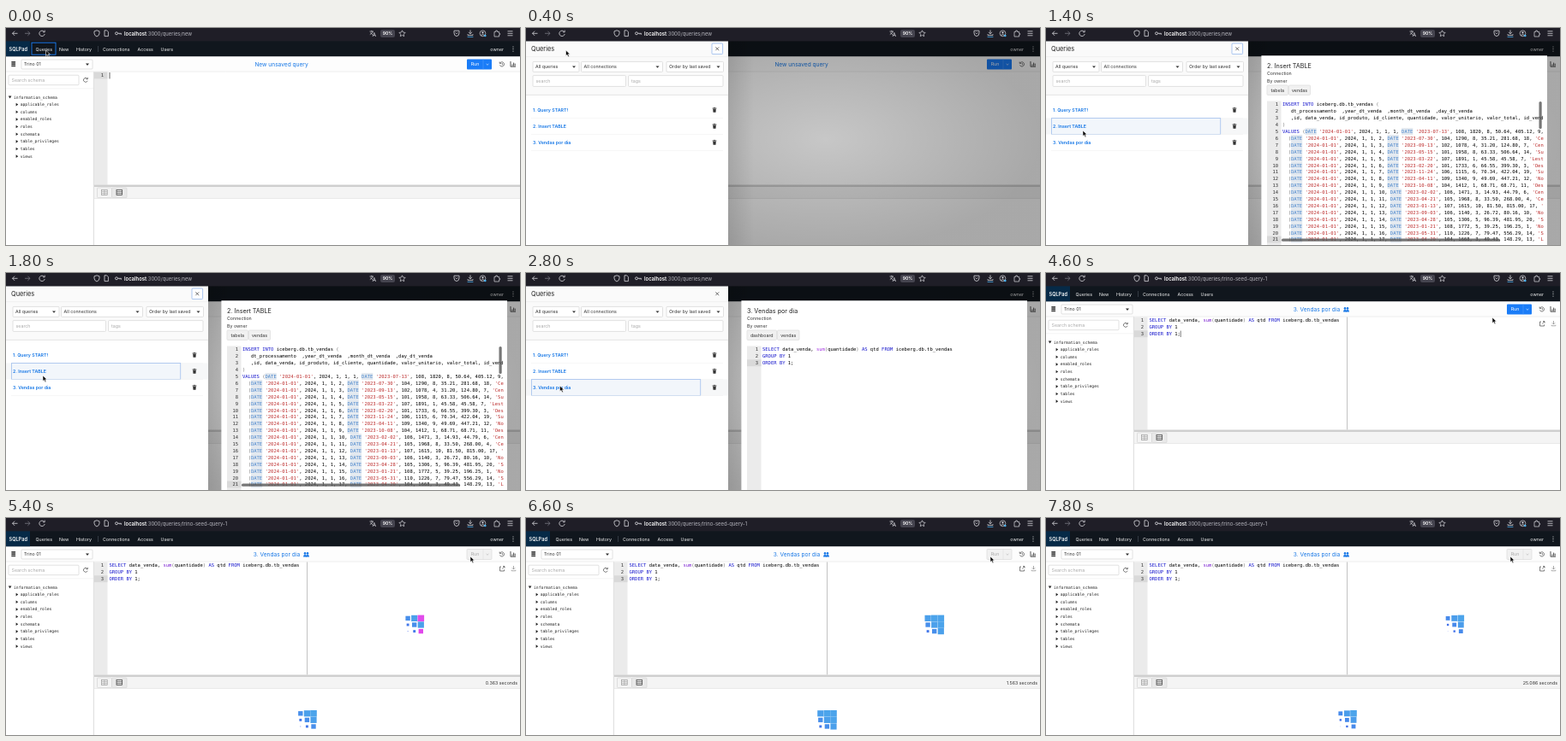
Write an HTML page that moves like this. It is 600x254 px and loops after 8 s.

```html
<!DOCTYPE html>
<html lang="en">
<head>
<meta charset="utf-8">
<title>Query editor</title>
<style>
  html, body { margin: 0; width: 100%; height: 100%; overflow: hidden; background: #fff; }
  svg { display: block; width: 100vw; height: 100vh; }
  text { font-family: Inter, "Open Sans", sans-serif; white-space: pre; }
  .mono { font-family: "DejaVu Sans Mono", monospace; }
</style>
</head>
<body>
<svg id="stage" viewBox="0 0 600 254"></svg>
<script>
const LOOP = 8000, STEP = 200;
const BLUE = '#1a7cf7', LINK = '#1677e6', INK = '#333', LINE = '#d4d4d4', SOFT = '#86aeea';
const USER = 'owner';
const TOP = 15.4;

// --- drawing helpers ---
const esc = s => String(s).replace(/&/g, '&amp;').replace(/</g, '&lt;');
const rect = (x, y, w, h, fill, more = '') =>
  `<rect x="${x}" y="${y}" width="${w}" height="${h}" fill="${fill}" ${more}/>`;
const box = (x, y, w, h, fill = '#fff', stroke = LINE) =>
  rect(x, y, w, h, fill, `rx="1" stroke="${stroke}" stroke-width=".7"`);
const text = (x, y, s, size = 5.3, fill = INK, more = '') =>
  `<text x="${x}" y="${y}" font-size="${size}" fill="${fill}" ${more}>${esc(s)}</text>`;
const path = (d, stroke, w = .8, fill = 'none') =>
  `<path d="${d}" stroke="${stroke}" stroke-width="${w}" fill="${fill}"/>`;
const group = (id, body, more = '') => `<g id="${id}" ${more}>${body}</g>`;
const caretDown = (x, y, fill = INK) => path(`M${x - 2} ${y - 1}h4l-2 2.4z`, 'none', 0, fill);
const select = (x, y, w, h, label) =>
  box(x, y, w, h) + text(x + 3, y + h / 2 + 1.9, label) + caretDown(x + w - 6, y + h / 2);
const input = (x, y, w, h, label) => box(x, y, w, h) + text(x + 3.5, y + h / 2 + 1.9, label, 5.3, '#aaa');

// --- SQL text ---
const PITCH = 7.9, CODE = 5.5, CHAR = CODE * .602;
const SHADES = { str: '#bc2c2c', type: '#4a86cc', word: '#1616cc', par: '#777' };
const TOKEN = /('[^']*'?)|\b(DATE)\b|\b(SELECT|AS|FROM|GROUP|ORDER|BY|INSERT|INTO|VALUES)\b|\b(sum)\b|([()])/g;

function highlight(line, fn) {
  return line.replace(TOKEN, (s, str, type, word, sum) => {
    const c = str ? SHADES.str : type ? SHADES.type : word ? SHADES.word : sum ? fn : SHADES.par;
    return `<tspan fill="${c}">${s}</tspan>`;
  });
}
function code(lines, x, y, numX, fn) {
  return lines.map((line, i) => {
    const base = y + i * PITCH, at = `class="mono" font-size="${CODE}" y="${base}"`;
    const marks = [...line.matchAll(/\bDATE\b/g)].map(m =>
      rect(x + m.index * CHAR, base - 5.9, 4 * CHAR, PITCH, '#e2e8ef')).join('');
    return marks + `<text ${at} x="${numX}" fill="#333" text-anchor="end">${i + 1}</text>` +
           `<text ${at} x="${x}" fill="#000">${highlight(line, fn)}</text>`;
  }).join('');
}

const selectSql = [
  'SELECT data_venda, sum(quantidade) AS qtd FROM iceberg.db.tb_vendas',
  'GROUP BY 1',
  'ORDER BY 1;'
];
// day, product, client, quantity, unit price, seller, region
const sales = `07-13 108 1820 8 50.64 9 Centro|07-30 104 1290 8 35.21 18 Centro
09-13 102 1078 4 31.20 7 Centro|05-15 101 1958 8 63.33 14 Sul
03-22 107 1891 1 45.58 7 Leste|02-20 101 1733 6 66.55 3 Oeste
11-24 106 1115 6 70.34 19 Sul|04-11 109 1340 9 49.69 12 Norte
10-08 104 1412 1 68.71 11 Oeste|02-02 106 1471 3 14.93 6 Centro
04-21 105 1968 8 33.50 4 Centro|01-13 107 1615 10 81.50 17 Sul
09-03 106 1140 3 26.72 10 Norte|04-28 105 1306 5 96.39 20 Sul
01-21 108 1772 5 39.25 1 Norte|05-31 110 1226 7 79.47 14 Sul
04-20 104 1668 3 49.43 13 Leste`.split(/[|\n]/);
const insertSql = [
  'INSERT INTO iceberg.db.tb_vendas (',
  '   dt_processamento  ,year_dt_venda  ,month_dt_venda  ,day_dt_venda',
  '   ,id, data_venda, id_produto, id_cliente, quantidade, valor_unitario, valor_total, id_vendedor',
  ')',
  ...sales.map((row, i) => {
    const [day, item, client, n, price, seller, region] = row.split(' ');
    return `${i ? '  ' : 'VALUES '}(DATE '2024-01-01', 2024, 1, 1, ${i + 1}, DATE '2023-${day}', ` +
      `${item}, ${client}, ${n}, ${price}, ${(n * price).toFixed(2)}, ${seller}, '${region}'),`;
  })
];

// --- browser bar ---
function browser() {
  const c = '#d8d8de';
  return rect(0, 0, 600, TOP, '#1f1e27') +
    path('M13.5 6.3h-6m2.6-2.6l-2.6 2.6l2.6 2.6', c) +
    path('M22 6.3h6m-2.6-2.6l2.6 2.6l-2.6 2.6', '#777780') +
    path('M44.6 4.4a3.2 3.2 0 1 0 .6 2.6M45.2 2.6v2.2h-2.2', c) +
    path('M106 2.8l3 1v2.4q0 2.6-3 3.8q-3-1.2-3-3.8v-2.4z', c) +
    path('M115 2.8h2.6l1.8 1.8v5h-4.4z', c) +
    `<circle cx="129" cy="6.3" r="1.5" fill="none" stroke="${c}" stroke-width=".8"/>` +
    path('M130.5 6.3h4v1.4m-1.6-1.4v1.2', c) +
    `<text y="8.6" x="138" font-size="5.9" fill="#b4b4bc"><tspan fill="#fff" font-weight="600">localhost</tspan>` +
    `<tspan id="url"></tspan></text>` +
    path('M424.5 4h4.5m-2.2-1.2v1.2m1.4 0q-.8 2.6-3.4 3.6m.8-2.2q1 1.6 2.4 2.2M428 10l1.8-4.6l1.8 4.6m-3-1.4h2.4', c, .7) +
    rect(437, 2, 17, 9, '#45444f', 'rx="2"') + text(445.5, 8.2, '90%', 5, '#fff', 'text-anchor="middle" font-weight="600"') +
    path('M462.5 2.8l1.1 2.3l2.5.3l-1.8 1.8l.4 2.5l-2.2-1.2l-2.2 1.2l.4-2.5l-1.8-1.8l2.5-.3z', c, .7) +
    path('M523 3.2h6v2.6q0 3.4-3 3.8q-3-.4-3-3.8zM524.6 5.4l1.4 1.4l1.4-1.4', c) +
    path('M542 2.4v4.4m-2-2l2 2l2-2m-5 2.4v1.2h6v-1.2', c) + path('M538.6 10.4h6.8', '#4cb4f4') +
    `<circle cx="556.5" cy="6.3" r="3.4" fill="none" stroke="${c}" stroke-width=".7"/>` +
    `<circle cx="556.5" cy="5.4" r="1.1" fill="${c}"/>` + path('M554.4 8.4q2.1-1.6 4.2 0', c) +
    `<circle cx="559.3" cy="9" r="1.3" fill="#4cb4f4"/>` +
    path('M570 4.4h1.8v-1.4h1.6v1.4h2.2v2h1v1.4h-1v2.2h-5.6z', c, .7) +
    path('M585.5 3.8h6m-6 2.5h6m-6 2.5h6', c);
}

// --- application page ---
function nav() {
  const items = [['Queries', 34.5], ['New', 62], ['History', 82], ['Connections', 113], ['Access', 153.5], ['Users', 180.5]];
  return rect(0, 14, 600, 19.5, '#10161d') + rect(0, 14, 28, 19.5, '#062a47') +
    text(3.5, 26.6, 'SQLPad', 5.6, '#fff', 'font-weight="600"') +
    items.map(([s, x]) => text(x, 26.6, s, 5.3, '#f2f2f2')).join('') +
    path('M107.5 21v7', '#56606a', .5) +
    text(581, 26.6, USER, 5.3, '#f2f2f2', 'text-anchor="end"') +
    [22, 24.5, 27].map(y => `<circle cx="592" cy="${y}" r=".6" fill="#eee"/>`).join('') +
    group('focus', rect(30, 17.2, 28, 14, 'none', `stroke="${BLUE}" stroke-width=".9"`));
}

function toolbar() {
  return rect(0, 33.5, 600, 17.5, '#fdfdfd') + path('M0 51.2h600', LINE, .6) +
    [40, 42.2, 44.4].map(y => rect(6.2, y - .9, 5, 1.7, '#444', 'rx=".7"')).join('') +
    select(18, 37, 83, 11, 'Trino 01') +
    group('fresh', text(321.5, 45, 'New unsaved query', 6.6, LINK, 'text-anchor="middle"')) +
    group('named', text(316, 45, '3. Vendas por dia', 6.6, LINK, 'text-anchor="middle"') +
      [349, 352].map(x => `<circle cx="${x}" cy="41.4" r="1.3" fill="${LINK}"/>` +
        path(`M${x - 2} 45.4q0-2.4 2-2.4t2 2.4z`, 'none', 0, LINK)).join('')) +
    group('run', rect(538, 36.5, 29, 12, BLUE, 'rx="1"') + path('M557 36.5v12', '#5aa2fa', .5) +
      text(547.5, 44.4, 'Run', 5.3, '#fff', 'text-anchor="middle"') + path('M560.6 42l1.4 1.3l1.4-1.3', '#fff', .6)) +
    group('busy', box(538, 36.5, 29, 12, '#f1f1f1', '#dadada') + path('M557 36.5v12', '#dadada', .5) +
      text(547.5, 44.4, 'Run', 5.3, '#aaa', 'text-anchor="middle"') + path('M560.6 42l1.4 1.3l1.4-1.3', '#aaa', .6)) +
    path('M576.7 41a2.6 2.6 0 1 1-.2 2.4M576.2 39.6v1.8h1.8M579.2 41v1.6l1.2.6', '#444', .7) +
    path('M589 39v6.2h6M591 44.6v-2m1.6 2v-4m1.6 4v-3', '#444', .9);
}

function sidebar() {
  const names = ['applicable_roles', 'columns', 'enabled_roles', 'roles', 'schemata', 'table_privileges', 'tables', 'views'];
  const item = (x, y, s) => text(x, y, s, 4.7, '#222', 'class="mono"');
  return rect(0, 51.5, 102, 203, '#fff') + input(3, 55.2, 82, 11.5, 'Search schema') +
    path('M94.8 59.4a2.4 2.4 0 1 0 .3 2.4M95.3 57.9v1.9h-1.9', '#444', .7) +
    path('M0 70.8h102', '#ececec', .5) +
    path('M2.8 79.6h3.6l-1.8 2.8z', 'none', 0, '#222') + item(9, 82.5, 'information_schema') +
    names.map((s, i) => {
      const y = 89.6 + i * 8.65;
      return path(`M11.6 ${y - 1.8}v3.6l2.6-1.8z`, 'none', 0, '#222') + item(16.7, y + 1.5, s);
    }).join('') + path('M102.4 51.5v203', LINE, .8);
}

const gutter = (x, y, w, h, row) =>
  rect(x, y, w, h, '#ebebeb') + rect(x, y + row * PITCH, w, PITCH, '#d9d9d9');

function editor() {
  return rect(103, 51.5, 497, 132, '#fff') +
    group('blank', gutter(103, 51.5, 15.5, 132, 0) +
      code([''], 120.5, 57.4, 114, '') + path('M121 52v7.4', '#222', .7)) +
    group('loaded', gutter(103, 51.5, 15.5, 132, 2) + code(selectSql, 120.5, 57.4, 114, '#7a1fd0') +
      path('M351.5 51.5v132', '#bbb', .9) +
      path('M578 57h-1.4v5h5v-1.6M579.2 59.4l2.8-2.8m-2 0h2v2', '#444', .7) +
      path('M592.5 56v4m-1.6-1.6l1.6 1.6l1.6-1.6m-4 2.4v1h4.8v-1', '#888', .7)) +
    group('caret', path('M157.2 67.6v7.4', '#222', .6));
}

function results() {
  const grid = (x, c) => rect(x, 189.6, 6.6, 5.8, 'none', `stroke="${c}" stroke-width=".7"`) +
    path(`M${x} 191.6h6.6m-6.6 2h6.6`, c, .6);
  return rect(103, 183.5, 497, 2.5, '#cfcfcf') + rect(103, 186, 497, 13.6, '#f4f4f4') +
    path('M103 199.8h497', LINE, .6) + rect(103, 200.1, 497, 54, '#fff') +
    box(106.5, 187, 17, 11.6, '#f4f4f4') + box(123.5, 187, 17.5, 11.6, '#e9e9e9') +
    grid(111.6, '#999') + path('M114.9 189.6v5.8', '#999', .6) + grid(129, '#333') +
    `<text id="timer" x="597" y="194.6" font-size="5.3" fill="${INK}" text-anchor="end"></text>`;
}

// --- drawer with the saved queries ---
const queries = ['1. Query START!', '2. Insert TABLE', '3. Vendas por dia'];
function drawer() {
  const row = (s, i) => {
    const y = 96 + i * 19;
    return group('row' + i, rect(0, y - 9.5, 236, 19, '#f6f7f8') +
        rect(6.3, y - 9.3, 197.5, 18.6, '#f2f6fb', `stroke="${SOFT}" stroke-width=".6"`)) +
      path(`M6 ${y + 9.5}h224`, '#eee', .5) +
      text(8, y + 1.9, s, 5.3, LINK, 'font-weight="600"') +
      path(`M217.6 ${y - 2}h4.8m-3.2-.6h1.6`, '#333', .9) +
      path(`M218.2 ${y - 1.2}h3.6l-.3 4h-3z`, 'none', 0, '#333');
  };
  return rect(236, TOP, 30, 240, 'url(#shade)') + rect(0, TOP, 236, 240, '#fff') +
    rect(0, TOP, 236, 78 - TOP, '#fafafa') + path('M0 33.6h236', '#e6e6e6', .5) + path('M0 78.4h236', LINE, .6) +
    text(6, 27.4, 'Queries', 7.4, '#222') +
    group('closeFocus', box(217, 18, 12.6, 12.6, '#fff', SOFT)) + path('M221.4 22.4l3.8 3.8m0-3.8l-3.8 3.8', '#333', .7) +
    select(8, 39.4, 54, 12, 'All queries') + select(64.5, 39.4, 95, 12, 'All connections') +
    select(164, 39.4, 66.5, 12, 'Order by last saved') +
    input(8, 55.6, 108.5, 12.8, 'search') + input(119.5, 55.6, 110.5, 12.8, 'tags') +
    queries.map(row).join('');
}

function preview(id, title, tags, lines, extra = '') {
  let x = 258;
  const labels = tags.map(([s, w]) => {
    const out = box(x, 67, w, 11.4, '#f1f1f1', '#dcdcdc') + text(x + w / 2, 74.7, s, 5.3, INK, 'text-anchor="middle"');
    x += w + 1;
    return out;
  }).join('');
  return group(id, rect(251.4, 32.3, 333.6, 222, '#fff') + text(258, 46.8, title, 7.2, '#222') +
    text(258, 55.4, 'Connection') + text(258, 64.2, 'By ' + USER) + labels +
    `<g clip-path="url(#page)">${gutter(258, 85.5, 16.5, 170, lines.length - 1)}` +
    `${code(lines, 276, 91.4, 271, '#a030e0')}${extra}</g>`);
}

// --- loading grid ---
const spinner = (id, x, y) => group(id, rect(0, 0, 0, 0, BLUE).repeat(9), `transform="translate(${x} ${y})"`);

const thumb = (x, y, w, h) => rect(x, y, w, h, '#555', 'rx="1.6" fill-opacity=".8"');
const stage = document.getElementById('stage');
stage.innerHTML = `<defs>
  <linearGradient id="shade"><stop offset="0" stop-opacity=".1"/><stop offset="1" stop-opacity="0"/></linearGradient>
  <radialGradient id="veil" gradientUnits="userSpaceOnUse" cx="0" cy="0" r="1"
    gradientTransform="translate(350 130) scale(250 130)">
    <stop offset="0" stop-opacity=".22"/><stop offset="1" stop-opacity=".34"/></radialGradient>
  <clipPath id="page">${rect(258, 85, 323, 170, '#000')}</clipPath></defs>` +
  rect(0, 0, 600, 254, '#fff') + nav() + toolbar() + editor() + results() + sidebar() +
  spinner('chartSpin', 465.3, 113.6) + spinner('tableSpin', 340, 225) +
  group('dim', rect(0, 14, 600, 240, 'url(#veil)')) +
  group('drawer', drawer()) +
  preview('insert', queries[1], [['tabela', 24.5], ['vendas', 25]], insertSql,
    thumb(275, 246.6, 255, 3.2) + thumb(575.5, 86, 3.2, 32)) +
  preview('select', queries[2], [['dashboard', 34.5], ['vendas', 25.5]], selectSql) +
  browser() +
  group('cursor', path('M0 0v6.6l1.6-1.4l1.1 2.5l1.2-.5l-1.1-2.5h2.1z', '#fff', .6, '#000'));

// --- motion ---
const $ = id => document.getElementById(id);
const show = (id, on) => $(id).setAttribute('visibility', on ? 'visible' : 'hidden');
const clamp = v => Math.max(0, Math.min(1, v));
const ease = v => { v = clamp(v); return v * v * (3 - 2 * v); };

const OPEN = 3200, RUN = 5037, CUT = 7400;
const track = [[0, 46.5, 26], [600, 46.5, 26], [1200, 43, 120], [2200, 43, 120], [2600, 39.5, 132],
  [3000, 39.5, 132], [3600, 340, 113], [3800, 340, 113], [4800, 542, 45], [LOOP, 542, 45]];

function pointer(t) {
  const i = track.findIndex(k => k[0] > t), [t0, x0, y0] = track[i - 1], [t1, x1, y1] = track[i];
  const p = ease((t - t0) / (t1 - t0));
  return [x0 + (x1 - x0) * p, y0 + (y1 - y0) * p];
}

const elapsed = t => (t < CUT ? t - RUN : t + 17286) / 1000;

function cubes(id, sec, tinted) {
  [...$(id).children].forEach((cube, i) => {
    const col = i % 3, row = Math.floor(i / 3), wait = (col + 2 - row) / 10;
    const p = sec < wait ? 0 : (sec - wait) % 1.3 / 1.3;
    const k = p < .35 ? 1 - ease(p / .35) : ease((p - .35) / .35);
    const size = 7.6 * k, off = (7.6 - size) / 2;
    const hue = tinted && col === 2 && row !== 1 ? 296 : 230 - 23 * k;
    const values = { x: col * 7.6 + off, y: row * 7.6 + off, width: size, height: size, fill: `hsl(${hue} 80% ${58 + 3 * k}%)` };
    for (const key in values) cube.setAttribute(key, values[key]);
  });
}

function draw(t) {
  const opened = t >= OPEN, running = t >= RUN, slide = ease((t - 80) / 280);
  $('url').textContent = ':3000/queries/' + (opened ? 'trino-seed-query-1' : 'new');
  show('focus', t < OPEN);
  for (const id of ['fresh', 'blank']) show(id, !opened);
  for (const id of ['named', 'loaded']) show(id, opened);
  show('caret', opened && !running);
  show('run', !running);
  show('busy', running);

  $('dim').setAttribute('opacity', opened ? 0 : slide);
  $('drawer').setAttribute('transform', `translate(${opened ? -300 : -276 * (1 - slide)} 0)`);
  const active = opened || t < 1200 ? -1 : t < 2400 ? 1 : 2;
  queries.forEach((q, i) => show('row' + i, i === active));
  show('closeFocus', t < 2600);
  show('insert', active === 1);
  show('select', active === 2);

  const sec = elapsed(t);
  $('timer').textContent = running ? sec.toFixed(3) + ' seconds' : '';
  for (const id of ['chartSpin', 'tableSpin']) {
    show(id, running);
    if (running) cubes(id, sec, id === 'chartSpin' && t < 6000);
  }
  $('cursor').setAttribute('transform', `translate(${pointer(t)})`);
}

const start = performance.now();
function tick() {
  const t = (performance.now() - start) % LOOP;
  draw(Math.floor(t / STEP) * STEP);
  requestAnimationFrame(tick);
}
tick();
</script>
</body>
</html>
```
